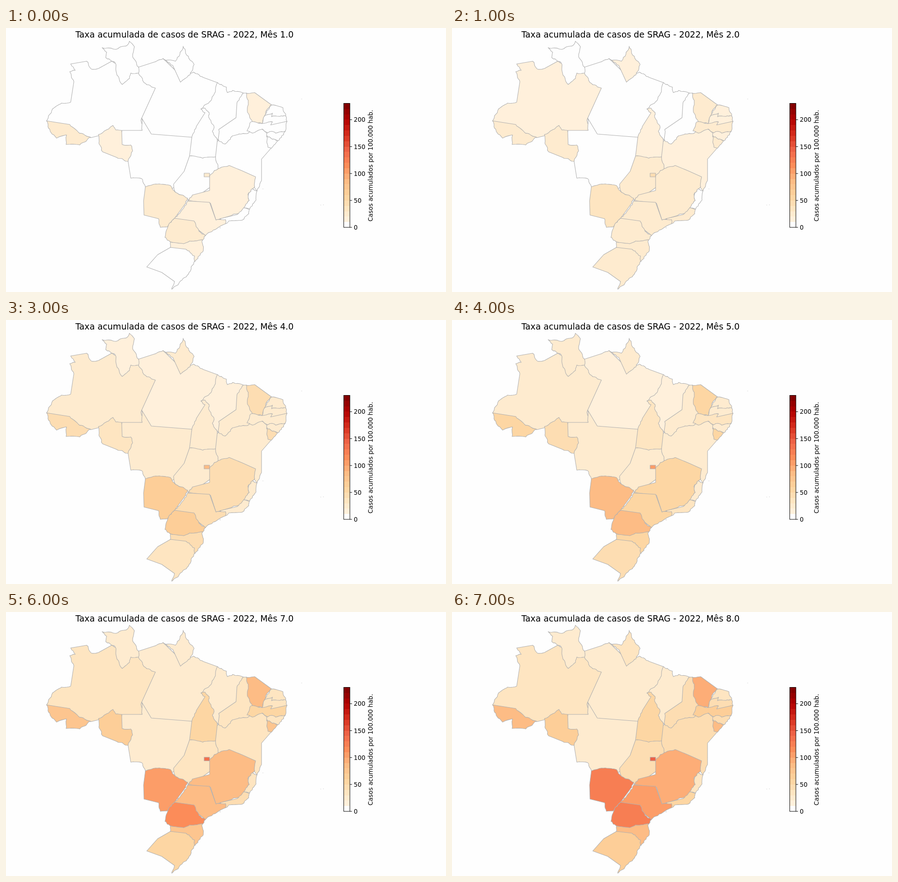
An HTML page that plays this animation: 966 by 580 pixels, repeating every 8 s.

```html
<!DOCTYPE html>
<html lang="pt">
<head>
<meta charset="utf-8">
<title>Taxa acumulada de casos de SRAG</title>
<style>
  html, body { margin: 0; height: 100%; overflow: hidden; background: #fefefe; }
  svg { display: block; width: 100%; height: 100%; }
  text { font: 13.42px "DejaVu Sans", sans-serif; }
  #title { font-size: 18.78px; }
  #map { stroke: #b0b0b0; stroke-width: 1.1; stroke-linejoin: round; }
</style>
</head>
<body>
<svg viewBox="0 0 966 580">
  <text id="title" x="392" y="21" text-anchor="middle"></text>

  <!-- Later states cover the loose edges of earlier ones. data-levels: one base-36 colour step per month. -->
  <g id="map">
    <polygon id="PA" data-levels="00111222" points="291,86 325,75 345,67 384,105 412,97 434,109 464,120 460,155 432,215 410,245 319,240 300,225 290,190 322,134 280,104"/>
    <polygon id="AM" data-levels="01222233" points="142,79 177,73 187,90 203,89 232,73 250,80 291,99 303,120 328,132 297,200 299,225 230,230 186,241 130,220 89,204 102,178 122,165 142,163 149,118 140,96 152,93"/>
    <polygon id="MT" data-levels="00122222" points="255,225 299,225 298,198 319,233 408,240 408,282 382,335 362,355 306,349 298,331 274,330 268,293 260,280 250,235"/>
    <polygon id="AP" data-levels="01222223" points="346,69 372,73 380,62 389,40 397,60 413,80 404,103 383,119 366,82"/>
    <polygon id="RR" data-levels="00112222" points="211,43 241,47 267,37 271,29 282,41 278,62 291,86 291,99 274,99 271,111 255,124 244,104 240,77 219,65 221,53"/>
    <polygon id="AC" data-levels="22245678" points="89,204 140,212 159,229 186,240 162,257 132,256 133,235 111,242 97,227"/>
    <polygon id="RO" data-levels="12234566" points="203,234 222,223 235,214 241,224 254,225 255,256 274,257 278,270 268,293 242,284 212,272 204,252"/>
    <polygon id="BA" data-levels="01222234" points="470,240 510,228 560,222 580,235 582,264 561,288 561,335 551,358 530,330 490,310 466,318 458,280 460,255"/>
    <polygon id="MA" data-levels="00011222" points="464,120 484,130 486,142 498,137 521,143 512,200 474,225 467,247 455,240 438,185 428,178 447,162 458,143"/>
    <polygon id="TO" data-levels="01223555" points="428,178 437,176 446,186 445,196 457,218 453,227 464,247 460,283 455,291 410,291 403,281 408,240 418,216 437,186"/>
    <polygon id="PI" data-levels="00222234" points="521,143 528,143 540,185 548,210 533,230 516,233 497,237 481,255 467,247 467,223 505,197 507,165"/>
    <polygon id="CE" data-levels="12345689" points="528,143 546,142 583,169 570,184 563,210 541,206 530,185 532,168"/>
    <polygon id="RN" data-levels="01222233" points="583,169 608,175 614,194 580,200 567,194"/>
    <polygon id="PB" data-levels="01222334" points="567,194 585,187 583,195 604,193 614,193 617,205 581,216 563,210"/>
    <polygon id="PE" data-levels="02223456" points="538,206 562,210 585,206 581,213 617,205 613,227 598,233 575,231 563,222 541,231 529,226"/>
    <polygon id="AL" data-levels="01222234" points="572,231 584,227 592,231 613,227 597,248 575,240"/>
    <polygon id="SE" data-levels="02245678" points="572,237 596,248 583,264 575,262"/>
    <polygon id="GO" data-levels="02222334" points="403,281 432,286 460,283 466,310 455,345 420,370 400,377 372,361 368,343 391,315"/>
    <polygon id="MG" data-levels="12245689" points="466,309 490,302 519,314 548,327 546,349 531,366 534,379 522,402 495,412 461,422 449,385 399,379 409,367 447,357 447,324 455,317"/>
    <polygon id="ES" data-levels="00222233" points="541,353 551,358 549,378 535,398 522,395 534,379 532,367"/>
    <polygon id="RJ" data-levels="02223445" points="522,395 534,398 533,408 519,422 489,424 482,430 470,419 507,410"/>
    <polygon id="SP" data-levels="1234568a" points="399,380 447,383 461,422 482,421 482,430 455,444 438,456 405,430 370,418 389,397"/>
    <polygon id="MS" data-levels="235689ac" points="306,349 332,343 361,346 372,361 399,374 390,391 370,418 354,437 339,438 335,419 303,411 302,380"/>
    <polygon id="PR" data-levels="225689bc" points="370,418 413,424 424,447 438,456 432,466 390,480 361,470 349,460 357,432"/>
    <polygon id="SC" data-levels="12245678" points="361,470 390,474 403,468 431,465 433,490 415,513 400,497 361,482"/>
    <polygon id="RS" data-levels="02234556" points="361,482 395,486 414,501 414,512 401,540 380,560 364,574 370,557 342,537 309,525 333,498"/>
    <polygon id="DF" data-levels="2468acde" points="435,319 447,319 447,327 435,327"/>
    <path d="M648.5 156h1M563.5 353.5h1M690.5 389h1M696.5 388.5h1M469 439h2"/>
  </g>

  <g id="bar"></g>
  <text transform="translate(805 302.5) rotate(-90)" text-anchor="middle">Casos acumulados por 100.000 hab.</text>
</svg>
<script>
const ramp = ["fff7ec", "fee8c8", "fdd49e", "fdbb84", "fc8d59", "ef6548", "d7301f", "b30000", "7f0000"]
  .map(hex => parseInt(hex, 16));
const LEVELS = 23;

function levelColor(level) {
  if (!level) return "#fefefe";
  const pos = (level + 0.3) / 22.5 * (ramp.length - 1);
  const i = Math.min(Math.floor(pos), ramp.length - 2);
  const mix = shift => {
    const a = ramp[i] >> shift & 255, b = ramp[i + 1] >> shift & 255;
    return Math.round(a + (b - a) * (pos - i));
  };
  return `rgb(${mix(16)},${mix(8)},${mix(0)})`;
}

// Short edges get a rugged line; the offset depends on position only, so neighbours agree.
function roughen(polygon) {
  const corners = polygon.getAttribute("points").split(" ").map(p => p.split(",").map(Number));
  const points = [];
  corners.forEach(([x, y], i) => {
    const [nextX, nextY] = corners[(i + 1) % corners.length];
    const length = Math.hypot(nextX - x, nextY - y);
    const parts = length > 8.5 && length < 31 ? Math.round(length / 4) : 1;
    points.push([x, y]);
    if (polygon.id === "DF") return;
    for (let k = 1; k < parts; k++) {
      const px = x + (nextX - x) * k / parts, py = y + (nextY - y) * k / parts;
      points.push([px + 1.2 * Math.sin(0.9 * px + 1.7 * py), py + 1.2 * Math.sin(1.6 * px - 0.8 * py)]);
    }
  });
  polygon.setAttribute("points", points.join(" "));
}

function drawBar() {
  const bottom = 438, step = 272 / LEVELS;
  let markup = "";
  for (let i = 0; i < LEVELS; i++)
    markup += `<rect x="741" y="${bottom - (i + 1) * step}" width="14" height="${step}" fill="${levelColor(i)}" shape-rendering="crispEdges"/>`;
  markup += `<rect x="741.5" y="165.5" width="13.5" height="272.5" fill="none" stroke="#000"/>`;
  for (let v = 0; v <= 200; v += 50) {
    const y = bottom - v * step / 10;
    markup += `<path d="M755 ${y}h4.7" stroke="#000"/><text x="763.5" y="${y + 5}">${v}</text>`;
  }
  document.getElementById("bar").innerHTML = markup;
}

const title = document.getElementById("title");
const states = document.querySelectorAll("polygon");
let shown = -1;

function frame(now) {
  const month = Math.floor(now / 1000) % 8;
  if (month !== shown) {
    shown = month;
    title.textContent = `Taxa acumulada de casos de SRAG - 2022, Mês ${month + 1}.0`;
    for (const state of states)
      state.setAttribute("fill", levelColor(parseInt(state.dataset.levels[month], 36)));
  }
  requestAnimationFrame(frame);
}

states.forEach(roughen);
drawBar();
frame(performance.now());
</script>
</body>
</html>
```
